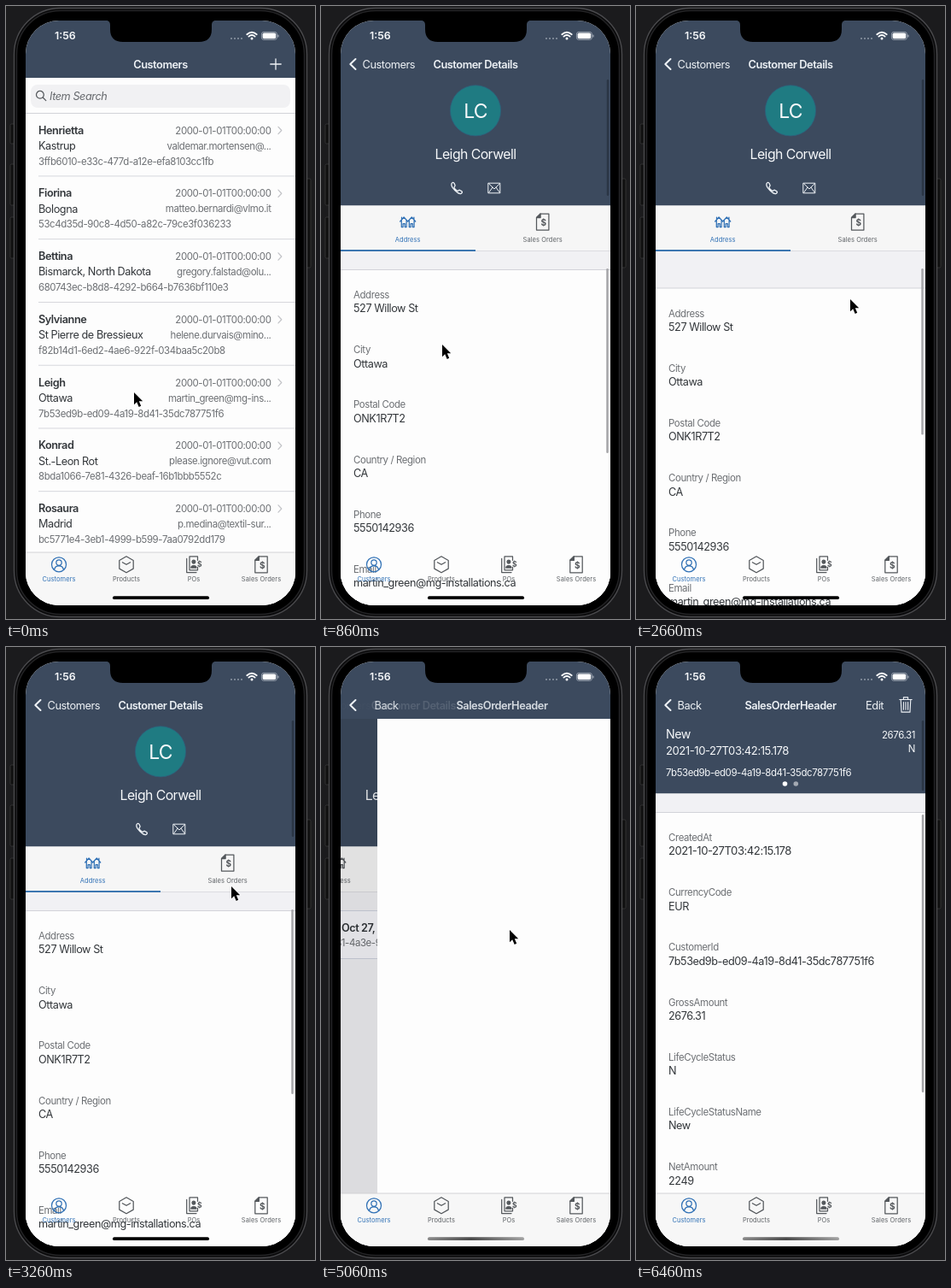
An HTML page that plays this animation: 362 px wide and 717 px high, repeating every 6800 ms.

```html
<!DOCTYPE html>
<html lang="en">
<head>
<meta charset="utf-8">
<title>Customer app walkthrough</title>
<style>
html, body { margin: 0; width: 100%; height: 100%; overflow: hidden; background: #1b1b1d; }
svg { display: block; width: 362px; height: 717px; }
text { font-family: Inter, "Noto Sans", sans-serif; font-size: 12.7px; letter-spacing: -.035em; fill: #32363a; }
.b { font-weight: 600; }
.s { font-size: 11.45px; fill: #6c6f73; }
.w { fill: #f6f8fa; }
.nav { font-size: 12.8px; fill: #eef2f6; }
.tiny { font-size: 7.5px; letter-spacing: .01em; fill: #5e6266; text-anchor: middle; }
.stamp { font-size: 13.1px; }
.m { text-anchor: middle; }
.e { text-anchor: end; }
.ic { fill: none; stroke: #54585c; stroke-width: 1.25; stroke-linejoin: round; stroke-linecap: round; }
.ic text { font-size: 9px; font-weight: 700; fill: #54585c; stroke: none; text-anchor: middle; }
.wi { fill: none; stroke: #eef2f6; stroke-width: 1.3; stroke-linejoin: round; stroke-linecap: round; }
.on .ic { stroke: #2f70b5; }
.on text { fill: #2f70b5; }
</style>
</head>
<body>
<svg id="stage" viewBox="0 0 362 717" xmlns="http://www.w3.org/2000/svg"></svg>
<script>
const NAVY = '#3c4a5e', WHITE = '#fdfdfd', GRAY = '#f1f1f4', LINE = '#d2d3d9';
const rect = (x, y, w, h, fill, more = '') =>
  `<rect x="${x}" y="${y}" width="${w}" height="${h}" fill="${fill}" ${more}/>`;
const text = (x, y, str, cls = '', more = '') =>
  `<text x="${x}" y="${y}" class="${cls}" ${more}>${str}</text>`;
const path = (d, cls = 'ic', more = '') => `<path d="${d}" class="${cls}" ${more}/>`;
const group = (id, body, more = '') => `<g id="${id}" ${more}>${body}</g>`;
const at = (x, y, body) => `<g transform="translate(${x} ${y})">${body}</g>`;
const bar = (x, y, h, fill, id = '') => rect(x - 1.2, y, 2.4, h, fill, `rx="1.2" ${id && `id="${id}"`}`);

// Icons, centred on 0,0
const person = path('M-8.5 0a8.5 8.5 0 1 0 17 0a8.5 8.5 0 1 0 -17 0M-3.2 -2.2a3.2 3.2 0 1 0 6.4 0a3.2 3.2 0 1 0 -6.4 0M-5.4 6.4C-5 2.4 -2.5 1.6 0 1.6S5 2.4 5.4 6.4');
const hexagon = path('M0 -9.5L8.2 -4.8V4.8L0 9.5L-8.2 4.8V-4.8ZM-4.6 -2.6L0 0L4.6 -2.6M0 0V0', 'ic', 'stroke-width="1.4"');
const orders = path('M-5 -9.3H4.5V-5M-5 -9.3V6.5H4.5V3M-8.3 -7V9.3H3') +
  path('M-2 -3.2a1.9 1.9 0 1 0 3.8 0a1.9 1.9 0 1 0 -3.8 0M-3.2 3.8C-3 .4 2.8 .4 3 3.8Z', 'ic', 'style="fill:#54585c"') +
  `<g class="ic">${text(6.6, 3, '$', '', 'style="font-size:8.5px"')}</g>`;
const invoice = path('M-2.6 -9.5H7.2V9.5H-7.2V-5Z') +
  path('M-2.6 -9.5V-5H-7.2Z', 'ic', 'style="fill:#54585c"') +
  `<g class="ic">${text(1, 4.4, '$', '', 'style="font-size:10px"')}</g>`;
const houses = path('M-9 -.5L-4.6 -5.5L0 -.5L4.6 -5.5L9 -.5M-7.4 -2V6H-5.6V2H-3.4V6H-1.6V-2M1.6 -2V6H3.4V2H5.6V6H7.4V-2M-7.2 -3V-5.5M7.2 -3V-5.5');

const field = (y, label, value, cls = '') => text(38, y, label, 's') + text(38, y + 16.4, value, cls);
const fields = (top, list) => list.map(([k, v, c], i) => field(top + 33 + 64.2 * i, k, v, c)).join('');

const customers = [
  ['Henrietta', 'Kastrup', 'valdemar.mortensen@...', '3ffb6010-e33c-477d-a12e-efa8103cc1fb'],
  ['Fiorina', 'Bologna', 'matteo.bernardi@vlmo.it', '53c4d35d-90c8-4d50-a82c-79ce3f036233'],
  ['Bettina', 'Bismarck, North Dakota', 'gregory.falstad@olu...', '680743ec-b8d8-4292-b664-b7636bf110e3'],
  ['Sylvianne', 'St Pierre de Bressieux', 'helene.durvais@mino...', 'f82b14d1-6ed2-4ae6-922f-034baa5c20b8'],
  ['Leigh', 'Ottawa', 'martin_green@mg-ins...', '7b53ed9b-ed09-4a19-8d41-35dc787751f6'],
  ['Konrad', 'St.-Leon Rot', 'please.ignore@vut.com', '8bda1066-7e81-4326-beaf-16b1bbb5552c'],
  ['Rosaura', 'Madrid', 'p.medina@textil-sur...', 'bc5771e4-3eb1-4999-b599-7aa0792dd179']
];
const PITCH = 73.75, TOP = 125.5;

const listPage = rect(23, 84, 316, 617, WHITE) +
  rect(29, 92, 304, 27, '#f1f1f3', 'rx="8"') +
  path('M35.5 103.8a4.4 4.4 0 1 0 8.8 0a4.4 4.4 0 1 0 -8.8 0M43.2 107L46.8 110.6') +
  text(51, 109.6, 'Item Search', '', 'style="font-style:italic;fill:#66696d"') +
  rect(23, 378 + 42.5, 316, PITCH, '#e0e0e4', 'id="rowHit"') +
  rect(23, 125, 316, 1, LINE) +
  customers.map(([name, city, mail, key], i) => at(0, TOP + PITCH * i,
    text(38, 24.2, name, 'b') + text(310.5, 24, '2000-01-01T00:00:00', 's e') +
    path('M319 15.8L322.8 20L319 24.2', 'ic', 'style="stroke:#c3c4c8"') +
    text(38, 42.4, city) + text(310.5, 42, mail, 's e') + text(38, 60, key, 's') +
    rect(38, 73, 301, .9, LINE))).join('') +
  rect(23, 84, 316, 617, '#000', 'id="dim1"');

const address = group('scroller',
  rect(23, 200, 316, 1000, GRAY) +
  rect(23, 308.5, 316, 396.5, WHITE) + rect(23, 308, 316, 1, LINE) +
  fields(309, [['Address', '527 Willow St'], ['City', 'Ottawa'], ['Postal Code', 'ONK1R7T2'],
    ['Country / Region', 'CA'], ['Phone', '5550142936'], ['Email', 'martin_green@mg-installations.ca']]) +
  rect(23, 704.5, 316, .8, LINE) + rect(23, 728.5, 316, 108.5, WHITE) + rect(23, 728, 316, 1, LINE) +
  field(761, 'Formatted Address', '527 Willow St') +
  text(38, 794, 'Ottawa, ONK1R7T2') + text(38, 810.6, 'CA') + rect(23, 836.5, 316, .8, LINE)) +
  bar(335.5, 307, 216, '#a3a3a6', 'thumb');

const sales = rect(23, 287, 316, 414, GRAY) +
  rect(23, 308.5, 316, 56, WHITE, 'id="orderHit"') +
  rect(23, 308, 316, 1, '#cfd3df') + rect(23, 364, 316, 1, '#cfd3df') +
  text(37.5, 332.6, 'Order Date: Oct 27, 2021', 'b') +
  text(37.5, 350.4, '1710d410-1b81-4a3e-9e62-a9fec3732bd6', 's') +
  text(324, 332.8, 'New', 's e') + text(324, 350.8, '€2,676.31', 's e');

const seg = (id, x, icon, label) => group(id, at(x, 252.5, icon) + text(x, 276, label, 'tiny'));
const detailPage = `<g clip-path="url(#page)">` +
  rect(23, 84, 316, 617, GRAY) +
  group('pager', address + at(316, 0, sales)) +
  rect(23, 84, 316, 149.5, NAVY) +
  `<circle cx="181" cy="122.3" r="29.6" fill="#1f7b82" stroke="#2f5f7c" stroke-width=".8"/>` +
  text(181, 130.6, 'LC', 'w m', 'style="font-size:23px"') +
  text(181, 179.4, 'Leigh Corwell', 'w m', 'style="font-size:15.8px"') +
  at(159, 213, path('M-6 -5.2C-5 -7 -3.6 -7 -2.9 -5.4L-1.9 -3.2C-1.6 -2.2 -3.4 -1.6 -3 -.6C-2.4 1 -.6 2.8 1 3.4C2 3.6 2.4 2 3.3 2.3L5.7 3.6C7 4.4 6.4 5.6 5 6.4C2 7.6 -7.6 -1.2 -6 -5.2Z', 'wi', 'stroke-width="1"')) +
  at(203, 213, path('M-6.8 -5.8H6.8V5.8H-6.8ZM-6.4 -5.2L0 1L6.4 -5.2M-6.4 5.2L-2 -.8M6.4 5.2L2 -.8', 'wi', 'style="stroke-width:1"')) +
  bar(336, 86, 136, '#2b3646') +
  rect(23, 233.5, 316, 53, '#f6f6f6') + rect(23, 286, 316, .8, '#d8d8dc') +
  seg('seg1', 101.7, houses, 'Address') + seg('seg2', 259.7, invoice, 'Sales Orders') +
  rect(23, 285, 158, 2, '#3c76b0', 'id="under"') +
  rect(23, 84, 316, 617, '#000', 'id="dim2"') + '</g>';

const orderPage = rect(23, 84, 316, 617, WHITE) + group('order',
  rect(23, 84, 316, 87.5, NAVY) +
  text(35, 106.8, 'New', 'w', 'style="font-size:14.2px"') +
  text(35, 126, '2021-10-27T03:42:15.178', 'w stamp') +
  text(35, 151.2, '7b53ed9b-ed09-4a19-8d41-35dc787751f6', 's w') +
  text(327, 107, '2676.31', 's w e') + text(327, 123, 'N', 's w e') +
  '<circle cx="174.5" cy="160" r="2.8" fill="#fff"/><circle cx="187.3" cy="160" r="2.8" fill="#a3a9b2"/>' +
  bar(336, 86, 82, '#2b3646') +
  rect(23, 171.5, 316, 22, GRAY) + rect(23, 193, 316, 1, LINE) +
  fields(194, [['CreatedAt', '2021-10-27T03:42:15.178', 'stamp'], ['CurrencyCode', 'EUR'],
    ['CustomerId', '7b53ed9b-ed09-4a19-8d41-35dc787751f6'], ['GrossAmount', '2676.31'],
    ['LifeCycleStatus', 'N'], ['LifeCycleStatusName', 'New'], ['NetAmount', '2249']]) +
  bar(336, 196, 325, '#a3a3a6'));

const navBar = rect(23, 17, 316, 67, NAVY) +
  group('title1', text(181, 72.6, 'Customers', 'nav b m')) +
  group('title2', text(181, 72.6, 'Customer Details', 'nav b m')) +
  group('title3', text(181, 72.6, 'SalesOrderHeader', 'nav b m')) +
  group('back1', text(48.5, 72.6, 'Customers', 'nav')) +
  group('back2', text(48.5, 72.6, 'Back', 'nav')) +
  group('chev', path('M40.5 62L34.3 68L40.5 74', 'wi', 'style="stroke-width:2"')) +
  group('plus', path('M309.8 68H322.2M316 61.8V74.2', 'wi')) +
  group('tools', text(269, 72.6, 'Edit', 'nav') +
    at(316, 67.5, path('M-7.2 -6H7.2M-2.6 -6V-8.6H2.6V-6M-5.8 -6L-5 8.6H5L5.8 -6M-2.6 -3V5.8M0 -3V5.8M2.6 -3V5.8', 'wi', 'style="stroke-width:1.1"'))) +
  text(57, 39.2, '1:56', 'w b', 'style="font-size:12.4px;letter-spacing:0"') +
  [0, 1, 2, 3].map(i => `<circle cx="${264 + i * 4}" cy="38" r="1.1" fill="#8a94a2"/>`).join('') +
  path('M282.3 33.2Q288 28.2 293.7 33.2M284.4 35.6Q288 32.4 291.6 35.6', 'wi', 'style="stroke-width:1.9;stroke:#fff"') +
  '<circle cx="288" cy="38" r="1.5" fill="#fff"/>' +
  rect(299.4, 30.4, 18, 9, 'none', 'rx="2.6" stroke="#aab2bd" stroke-width=".8"') +
  rect(300.6, 31.6, 15.6, 6.6, '#fff', 'rx="1.7"') + rect(318.4, 33.4, 1.1, 3, '#aab2bd', 'rx=".5"');

const tab = (x, icon, label, cls = '') =>
  `<g class="${cls}">${at(x, 653.3, icon)}${text(x, 672.6, label, 'tiny')}</g>`;
const tabBar = group('tabBack', rect(23, 639, 316, 62, '#f7f7f7') + rect(23, 638.6, 316, .9, '#cfcfd3')) +
  tab(62, person, 'Customers', 'on') + tab(141, hexagon, 'Products') +
  tab(220, orders, 'POs') + tab(299, invoice, 'Sales Orders') +
  rect(125, 690.3, 113, 3.8, '#000', 'rx="1.9" id="home"');

const shell = rect(0, 0, 362, 717, '#1b1b1d') +
  [[138, 23], [185, 48], [247, 48]].map(([y, h]) => rect(5, y, 6, h, '#111', 'rx="1.5" stroke="#3a3a3c" stroke-width=".8"')).join('') +
  rect(351, 202, 6, 104, '#111', 'rx="1.5" stroke="#3a3a3c" stroke-width=".8"') +
  rect(9.5, 2.5, 343, 712, '#0a0a0b', 'rx="54" stroke="#4a4a4d" stroke-width="1.4"') +
  rect(12.5, 5.5, 337, 706, '#000', 'rx="51" stroke="#232325" stroke-width="1.5"');

const stage = document.getElementById('stage');
stage.innerHTML = `<defs>
  <clipPath id="screen">${rect(23, 17, 316, 684, '#000', 'rx="39"')}</clipPath>
  <clipPath id="page">${rect(23, 84, 316, 617, '#000')}</clipPath>
  <linearGradient id="fade"><stop offset="0" stop-color="#8a8a8a"/><stop offset=".45" stop-color="#4c4c4c"/><stop offset="1" stop-color="#a2a2a2"/></linearGradient>
</defs>` + shell +
  `<g clip-path="url(#screen)">` + rect(23, 17, 316, 684, WHITE) +
  group('list', listPage) + group('detail', detailPage) + group('sale', orderPage) + tabBar + navBar +
  path('M116 16.5Q122 17 122 22V27Q122 42 137 42H226Q241 42 241 27V22Q241 17 247 16.5Z', '', 'fill="#000"') + '</g>' +
  group('cursor', path('M0 0V14.2L3.2 11.2L5.7 16.9L8.2 15.8L5.8 10.3H10.2Z', '', 'fill="#000" stroke="#fff" stroke-width="1.1" paint-order="stroke"'));

const el = {};
stage.querySelectorAll('[id]').forEach(n => el[n.id] = n);
const set = (id, name, v) => el[id].setAttribute(name, v);
const move = (id, x, y = 0) => set(id, 'transform', `translate(${x.toFixed(2)} ${y.toFixed(2)})`);
const alpha = (id, v) => set(id, 'opacity', v.toFixed(3));

const easeOut = (t, start, len) => 1 - (1 - Math.min(1, Math.max(0, (t - start) / len))) ** 3;
function track(keys, t, col) {
  let i = keys.findIndex(k => k[0] > t);
  if (i < 0) return keys[keys.length - 1][col];
  if (!i) return keys[0][col];
  const a = keys[i - 1], b = keys[i];
  return a[col] + (b[col] - a[col]) * (t - a[0]) / (b[0] - a[0]);
}

const scrollKeys = [[860, 0], [1060, 8], [1260, 72], [1460, 138], [1660, 158], [1860, 160],
  [2060, 160], [2260, 132], [2460, 40], [2660, -21.5], [2860, -7], [3060, 0]];
const cursorKeys = [[60, 150, 452], [460, 149, 450], [860, 142, 396], [1060, 142, 390], [1460, 138, 308],
  [1660, 138, 302], [2060, 138, 302], [2260, 180, 296], [2460, 236, 318], [2660, 251, 343],
  [2860, 253, 332], [3260, 264, 280], [3460, 267, 266], [4060, 267, 266], [4460, 225, 326],
  [4660, 221, 331], [5660, 221, 331], [5860, 160, 230], [6060, 60, 90], [6260, -20, -30]];

const LOOP = 6800, STEP = 200, WIDTH = 316;

function draw(ms) {
  const t = ms < 60 ? 0 : Math.min(6460, 60 + STEP * Math.floor((ms - 60) / STEP));
  const p1 = easeOut(t, 400, 453), p2 = easeOut(t, 4840, 453), swipe = easeOut(t, 3600, 374);
  const y = track(scrollKeys, t, 1);

  move('list', -.3 * WIDTH * p1);
  move('detail', WIDTH * (1 - p1) - .3 * WIDTH * p2);
  move('sale', WIDTH * (1 - p2));
  alpha('dim1', .1 * p1);
  alpha('dim2', .1 * p2);
  alpha('rowHit', t >= 260 && t < 860 ? 1 : 0);
  set('orderHit', 'fill', t >= 4660 ? '#f6f6fa' : WHITE);

  move('scroller', 0, -y);
  set('thumb', 'y', 307 + Math.max(0, y) * .525);
  set('thumb', 'height', 216 + Math.min(0, y));
  move('pager', -WIDTH * swipe);
  move('under', 158 * swipe ** .45);
  set('seg1', 'class', swipe > 0 ? '' : 'on');
  set('seg2', 'class', swipe > 0 ? 'on' : '');

  move('title1', -84 * p1);
  alpha('title1', 1 - p1);
  move('title2', 228 * (1 - p1) - 84 * p2);
  alpha('title2', p1 * (1 - p2));
  move('title3', 228 * (1 - p2));
  alpha('title3', p2);
  move('back1', 103 * (1 - p1) - 60 * p2);
  alpha('back1', p1 * (1 - p2) ** 2);
  move('back2', 103 * (1 - p2));
  alpha('back2', p2);
  alpha('chev', p1);
  alpha('plus', 1 - p1);

  const loaded = t >= 5860 ? 1 : 0;
  alpha('order', loaded);
  alpha('tools', loaded);
  alpha('tabBack', p2 > 0 ? 1 : 1 - p1);
  set('home', 'fill', t < 3460 ? '#000' : 'url(#fade)');
  move('cursor', track(cursorKeys, t, 1), track(cursorKeys, t, 2));
}

const begin = performance.now();
function tick(now) {
  draw(Math.max(0, now - begin) % LOOP);
  requestAnimationFrame(tick);
}
draw(0);
requestAnimationFrame(tick);
</script>
</body>
</html>
```
